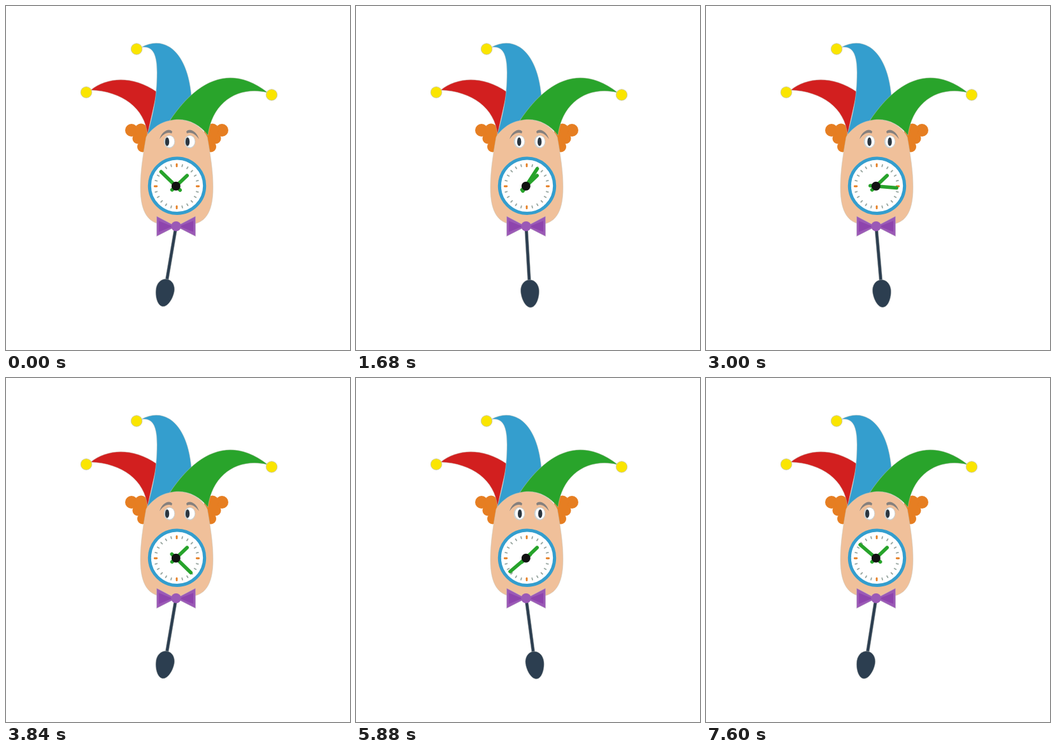
An HTML page that plays this animation: 540x540 px, repeating every 7.64 s.

```html
<!DOCTYPE html>
<html lang="en">
<head>
<meta charset="utf-8">
<title>Jester clock</title>
<style>
  html, body { margin: 0; width: 100%; height: 100%; overflow: hidden; background: #fff; }
  svg { display: block; width: 100%; height: 100%; }
</style>
</head>
<body>
<svg viewBox="0 0 540 540">
  <g id="pendulum" fill="#2c3e50" stroke="#b9bdb9" stroke-width=".5">
    <path d="M-2.5 0H2.5V88H-2.5Z"/>
    <path d="M0 84.5C9 84.5 14.5 93 14.5 101.5C14.5 114 8 128 0 128S-14.5 114 -14.5 101.5C-14.5 93 -9 84.5 0 84.5Z"/>
  </g>

  <g fill="#e67e22">
    <g id="hair">
      <circle cx="197" cy="195" r="10"/>
      <circle cx="212" cy="194" r="9.5"/>
      <circle cx="207" cy="208" r="8.5"/>
      <circle cx="214.500" cy="221" r="8.500"/>
      <path d="M200 190H225V225H214Z"/>
    </g>
    <use href="#hair" transform="matrix(-1 0 0 1 536 0)"/>
  </g>

  <g stroke="#c4c4b8" stroke-width=".5">
    <path fill="#f0c09a" d="M268 178C246 178 226 192 220 206C214 240 211 262 211 285C211 325 224 343 250 343H286C312 343 325 325 325 285C325 262 322 240 316 206C310 192 290 178 268 178Z"/>
    <path fill="#d21f1f" d="M133 132C158 112 198 108 237 135L222 202C218 160 182 134 133 132Z"/>
    <path fill="#349ece" d="M212 65C250 44 285 73 291 141L257 180C244 182 232 190 222 202C229 175 237 148 237 104C237 75 230 62 212 65Z"/>
    <path fill="#29a42b" d="M257 180C297 120 350 88 411 136C365 125 324 150 317 203C303 184 280 174 257 180Z"/>
    <g fill="#fae500" stroke="#c4c4b8" stroke-width=".8">
      <circle cx="126" cy="135.500" r="8.800"/>
      <circle cx="205" cy="67.500" r="8.800"/>
      <circle cx="417" cy="139.500" r="8.800"/>
    </g>
  </g>

  <g fill="#85807e">
    <path id="brow" d="M241 209C245 196 256 191 261 197L260 200C253 197 247 201 241 209Z"/>
    <use href="#brow" transform="matrix(-1 0 0 1 544 0)"/>
  </g>

  <g id="eye">
    <ellipse cx="256.500" cy="213" rx="8.800" ry="10.300" fill="#ccd1d1"/>
    <ellipse cx="257" cy="212.700" rx="7.300" ry="9" fill="#fff"/>
    <ellipse id="pupil" cy="213" rx="3.200" ry="6.800" fill="#2b3640"/>
  </g>
  <use href="#eye" x="32"/>

  <circle cx="268.500" cy="282.300" r="43.200" fill="#fff" stroke="#349ece" stroke-width="5"/>
  <g id="ticks" transform="translate(268 283)" stroke-linecap="round"></g>
  <g transform="translate(266.800 282.800)" stroke="#27a32b" stroke-width="5.600" stroke-linecap="round">
    <path d="M0 8.500V-24" transform="rotate(46.500)"/>
    <path id="minute" d="M0 9V-32.500"/>
    <circle r="7" fill="#111" stroke="none"/>
  </g>

  <g id="wing">
    <path fill="#9b59b6" stroke="#c0b8c4" stroke-width=".5" d="M236.500 330V361.500L267 346Z"/>
    <path fill="#8e44ad" d="M240 337.500V354.500L262 346Z"/>
  </g>
  <use href="#wing" transform="matrix(-1 0 0 1 534 0)"/>
  <circle cx="267" cy="345.800" r="7.800" fill="#9b59b6"/>
</svg>
<script>
  const LOOP = 7640, STEP = 40, TURN = 7680, SWING = 1280;
  const get = id => document.getElementById(id);
  const pendulum = get('pendulum'), minute = get('minute'), pupil = get('pupil');

  // Every sixth tick marks a quarter hour
  get('ticks').innerHTML = Array.from({ length: 24 }, (_, i) => {
    const style = i % 6
      ? 'd="M0 -32V-35" stroke="#98a6a0" stroke-width="1.8"'
      : 'd="M0 -31.3V-34.700" stroke="#e67e22" stroke-width="2.800"';
    return `<path ${style} transform="rotate(${i * 15})"/>`;
  }).join('');

  function draw(now) {
    const t = Math.floor((now % LOOP) / STEP) * STEP;
    const swing = -Math.cos(2 * Math.PI * t / SWING);
    pendulum.setAttribute('transform', `translate(267 345.500) rotate(${0.25 - 9.45 * swing})`);
    minute.setAttribute('transform', `rotate(${314.2 + 360 * t / TURN})`);
    pupil.setAttribute('cx', 255.3 + 2.3 * swing);
  }

  const start = performance.now();
  function tick() {
    draw(performance.now() - start);
    requestAnimationFrame(tick);
  }
  tick();
</script>
</body>
</html>
```
